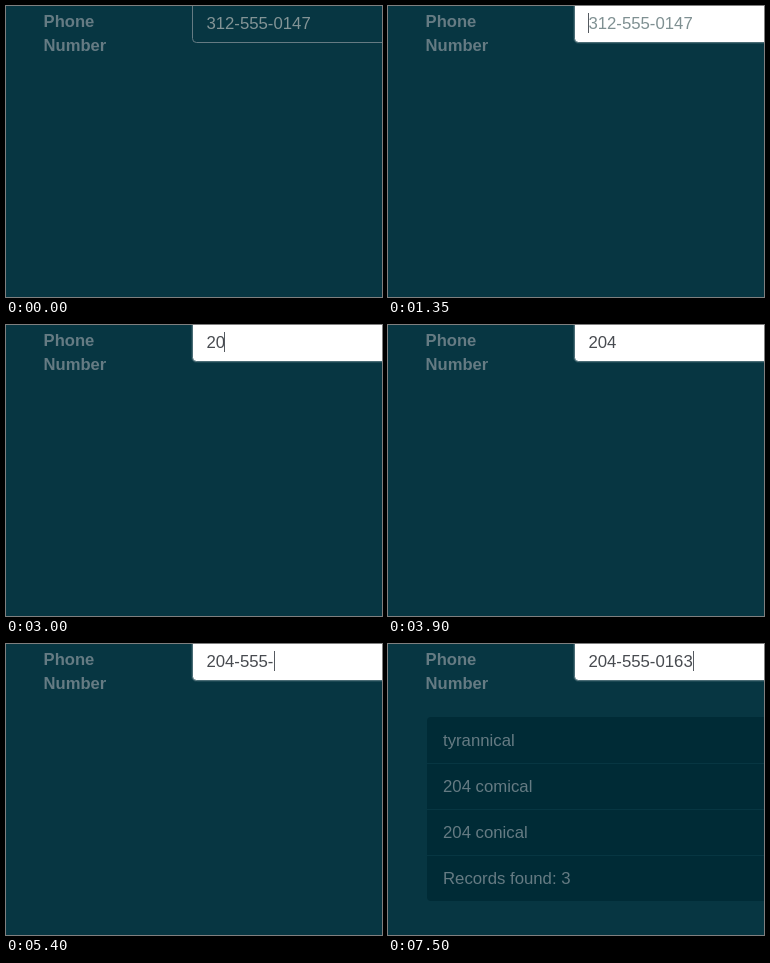
Animation, 376 px wide and 291 px high, one loop 8000 ms. Source, as an HTML page:

```html
<!DOCTYPE html>
<html lang="en">
<head>
<meta charset="utf-8">
<style>
  html, body { margin: 0; width: 100%; height: 100%; overflow: hidden; background: #073642; }
  svg { display: block; width: 376px; height: 291px; }
  text { font: 16.75px "Liberation Sans", Arial, sans-serif; fill: #657b83; }
  .label { font-size: 16.6px; font-weight: bold; }
</style>
</head>
<body>
<svg viewBox="0 0 376 291">
  <text class="label" x="37.6" y="21">Phone</text>
  <text class="label" x="37.6" y="45">Number</text>

  <rect id="glow" x="185.5" y="-9.5" width="220" height="47" rx="5" fill="none" stroke="#1c4853"/>
  <rect id="field" x="186.5" y="-8.5" width="220" height="45" rx="4"/>
  <text id="value" x="200.4" y="23.3"></text>
  <rect id="caret" y="7" width="1" height="20" fill="#555a60"/>

  <g id="results">
    <rect x="39" y="73" width="360" height="184" rx="4" fill="#002b36"/>
    <path d="M39 119.5H376M39 165.5H376M39 211.5H376" stroke="#073642"/>
    <text x="55" y="102">tyrannical</text>
    <text x="55" y="148">204 comical</text>
    <text x="55" y="194">204 conical</text>
    <text x="55" y="240">Records found: 3</text>
  </g>
</svg>
<script>
  const el = id => document.getElementById(id);
  const [glow, field, value, caret, results] =
    ["glow", "field", "value", "caret", "results"].map(el);
  const HINT = "312-555-0147", TYPED = "204-555-0163", LOOP = 8000;

  // [time, typed characters]
  const keys = [[0, 0], [3000, 2], [3450, 3], [4350, 4], [4500, 5], [4950, 7],
    [5400, 8], [6000, 9], [6150, 10], [6300, 11], [6600, 12]];
  // Spans in which the caret is hidden
  const hidden = [[0, 300], [750, 1350], [1800, 2250], [2850, 3000], [3900, 4350], [7050, 7500]];

  const show = (node, on) => node.setAttribute("visibility", on ? "visible" : "hidden");

  function caretX(text) {
    const dashes = text.split("-").length - 1;
    return Math.floor(200.5 + 9.21 * (text.length - dashes) + 6.22 * dashes);
  }

  function draw(t) {
    const focused = t >= 300, lit = t >= 450;
    const count = keys.filter(k => k[0] <= t).pop()[1];
    const text = TYPED.slice(0, count);

    field.setAttribute("fill", focused ? "#fff" : "#073642");
    field.setAttribute("stroke", lit ? "#4a6c75" : "#657b83");
    show(glow, lit);
    value.textContent = text || HINT;
    value.style.fill = text ? "#484b50" : focused ? "#7f9092" : "#839496";
    caret.setAttribute("x", text ? caretX(text) : 200);
    show(caret, !hidden.some(([a, b]) => t >= a && t < b));
    show(results, t >= 6900);
  }

  const start = performance.now();
  function frame() {
    draw((performance.now() - start) % LOOP);
    requestAnimationFrame(frame);
  }
  frame();
</script>
</body>
</html>
```
